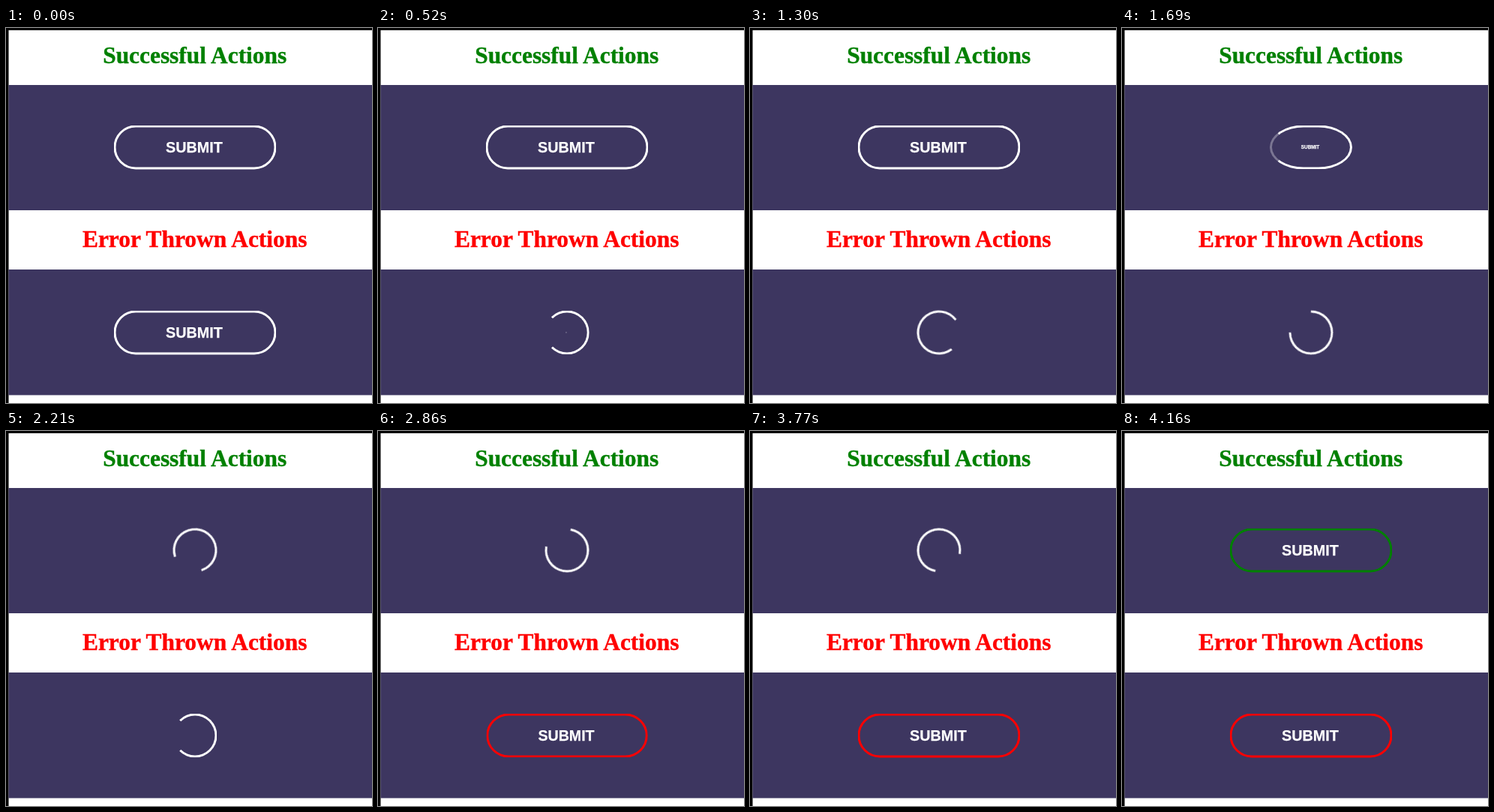
An HTML page for the animation above (4.42 s loop, 488 px wide and 500 px high).

```html
<!DOCTYPE html>
<html lang="en">
<head>
<meta charset="utf-8">
<title>Submit buttons</title>
<style>
  html, body { margin: 0; width: 100%; height: 100%; overflow: hidden; background: #fff; }
  #stage { position: absolute; left: 0; top: 0; width: 488px; height: 500px; overflow: hidden; }
  svg { position: absolute; left: 0; top: 0; }
  svg text {
    font: bold 31.4px "Liberation Serif", "Times New Roman", serif;
    text-anchor: middle; stroke-width: .4px;
  }
  /* Laid out at double size for half-pixel detail; translate comes before rotate. */
  .button {
    position: absolute; left: 252.2px; width: 434px; height: 118px;
    box-sizing: border-box; border: 6px solid #fff; border-radius: 80px;
    translate: -50% -50%; scale: .5;
    display: flex; align-items: center; justify-content: center;
    color: #fff; font: bold 39.6px/1 "Liberation Sans", Arial, sans-serif;
    -webkit-text-stroke: .5px #fff; white-space: nowrap;
  }
  .button span { position: relative; left: -2px; }
  #success { top: 159.3px; }
  #error { top: 405.6px; }
</style>
</head>
<body>
<div id="stage">
  <svg width="488" height="500" viewBox="0 0 488 500">
    <rect width="488" height="500" fill="#000"/>
    <rect x="3.5" y="3" width="485" height="497" fill="#fff"/>
    <g fill="#3d3660">
      <rect x="3.5" y="76" width="485" height="167"/>
      <rect x="3.5" y="322" width="485" height="167.5"/>
    </g>
    <text x="251.7" y="47" fill="#008000" stroke="#008000">Successful Actions</text>
    <text x="251.7" y="292.2" fill="#f00" stroke="#f00">Error Thrown Actions</text>
  </svg>
  <div class="button" id="success"><span>SUBMIT</span></div>
  <div class="button" id="error"><span>SUBMIT</span></div>
</div>
<script>
const LOOP = 4420, STEP = 130, FIRST = 390, LAST = 4160, MORPH = 250;

const wide = color => ({
  width: '434px', borderRadius: '80px', fontSize: '39.6px',
  borderColor: color, borderLeftColor: color
});
const round = {
  width: '118px', borderRadius: '50%', fontSize: '0px',
  borderColor: '#fff', borderLeftColor: 'rgba(255,255,255,0)'
};

const at = (ms, props) => ({ offset: ms / LOOP, ...props });

function prepare(element, frames) {
  const animation = element.animate(frames, { duration: LOOP, fill: 'both' });
  animation.pause();
  return animation;
}

// turns: [time in ms, degrees] while the spinner is showing
function buildButton(id, color, shrink, expand, turns) {
  const element = document.getElementById(id);
  const ease = { easing: 'ease' };
  const shape = prepare(element, [
    at(0, wide('#fff')),
    at(shrink, { ...wide('#fff'), ...ease }),
    at(shrink + MORPH, round),
    at(expand, { ...round, ...ease }),
    at(expand + MORPH, wide(color)),
    at(LOOP, wide(color))
  ]);
  const spin = prepare(element, [
    [0, 0], [shrink + MORPH, 0], ...turns, [expand, 0], [LOOP, 0]
  ].map(([ms, degrees]) => at(ms, { rotate: degrees + 'deg' })));
  return [shape, spin];
}

const animations = [
  ...buildButton('success', '#008000', 1591, 3900,
    [[2210, 297], [2860, 775], [3380, 1081], [3900, 1393]]),
  ...buildButton('error', '#f00', 290, 2642,
    [[910, 331], [1690, 765], [2210, 1080], [2642, 1339]])
];

const start = performance.now();

function draw() {
  const time = (performance.now() - start) % LOOP;
  const held = time < FIRST ? 0 : Math.min(Math.floor(time / STEP) * STEP, LAST);
  for (const animation of animations) animation.currentTime = held;
  requestAnimationFrame(draw);
}
draw();
</script>
</body>
</html>
```
